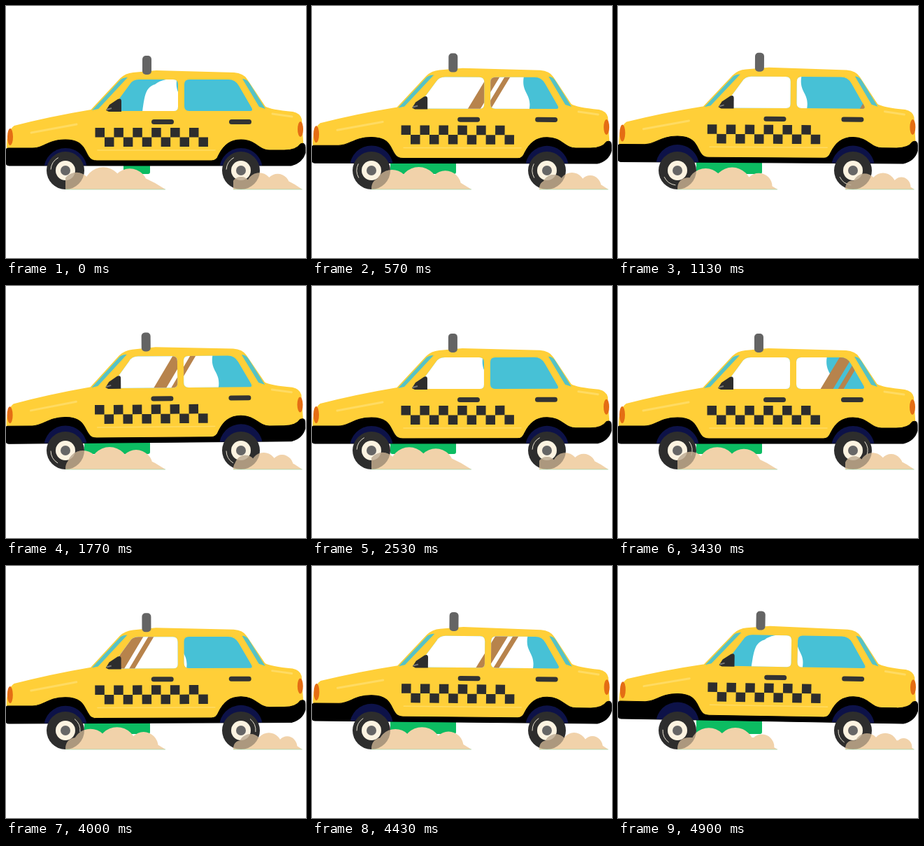
An HTML page with a canvas that plays this animation: 429x360 px, repeating every 5000 ms.

```html
<!DOCTYPE html>
<html lang="en">
<head>
<meta charset="utf-8">
<title>Taxi</title>
<style>
html, body { margin: 0; height: 100%; overflow: hidden; background: #fff; }
canvas { display: block; }
</style>
</head>
<body>
<canvas id="stage" width="429" height="360"></canvas>
<script>
const ctx = document.getElementById('stage').getContext('2d');
const LOOP = 5000, CYCLE = LOOP / 4, STEP = 1000 / 15, TAU = 2 * Math.PI;
const TEAL = '#47c1d6', DARK = '#2d2d2d', YELLOW = '#ffcf38', SHINE = '#ffdb62';
const WHEELS = [85, 336];

const body = new Path2D(`M2 205 Q1 180 12 172 Q62 159 122 149 L164 104 Q171 97 182 96
  L215 93 L326 96 Q339 97 344 105 L370 144 Q378 149 410 152 Q420 154 422 162
  L425 208 H375 V224 H60 V208 Z`);
const skirt = new Path2D(`M3 203 H38 C54 203 60 191 85 191 C112 191 112 207 119 216
  Q122 221 130 221 H294 Q301 221 304 213 C311 199 320 191 336 191
  C358 191 361 206 377 206 H398 Q415 206 421 197 Q428 194 428 202 V210
  Q424 224 408 228 H4 Q0 228 0 224 V206 Q0 203 3 203 Z`);
const panes = new Path2D(`M190 105 H239 Q246 105 246 112 V144 Q246 150 240 150 H149
  L177 112 Q181 105 190 105 Z
  M262 105 H318 Q328 105 333 114 L351 145 Q354 150 349 150 H262 Q255 150 255 143 V112 Q255 105 262 105 Z`);
const slivers = new Path2D(`M123 149 L164 105 Q168 102 174 102 L132 147 Z
  M338 104 Q344 104 348 110 L371 147 L362 144 Z`);
const mirror = new Path2D('M148 141 L160 133 Q165 131 165 136 V151 H147 L143 149 Z');

function fill(color, path) {
  ctx.fillStyle = color;
  path ? ctx.fill(path) : ctx.fill();
}

function outline(color, width, path) {
  ctx.strokeStyle = color;
  ctx.lineWidth = width;
  path ? ctx.stroke(path) : ctx.stroke();
}

function disc(color, x, y, rx, ry = rx) {
  ctx.beginPath();
  ctx.ellipse(x, y, rx, ry, 0, 0, TAU);
  fill(color);
}

function pill(color, x, y, w, h, r) {
  ctx.beginPath();
  ctx.roundRect(x, y, w, h, r);
  fill(color);
}

function line(color, width, x1, y1, x2, y2) {
  ctx.beginPath();
  ctx.moveTo(x1, y1);
  ctx.lineTo(x2, y2);
  outline(color, width);
}

function slant(color, x, width) {
  ctx.beginPath();
  ctx.moveTo(x, 152);
  ctx.lineTo(x + 29, 104);
  ctx.lineTo(x + 29 + width, 104);
  ctx.lineTo(x + width, 152);
  fill(color);
}

// pale scenery and a double pole pass behind the glass
function drawWindows(t) {
  const phase = t % CYCLE;
  const left = 120 + 75 * Math.cos(Math.PI * t / LOOP) ** 40;
  const right = 284 - 34 * Math.cos(TAU * (phase - 75) / CYCLE);
  const pole = 110 + .18 * phase + 3e-5 * phase ** 2;
  fill(TEAL, panes);
  fill('#55c2c6', slivers);
  ctx.save();
  ctx.clip(panes);
  ctx.beginPath();
  ctx.moveTo(left, 151);
  ctx.bezierCurveTo(left + 3, 130, left + 4, 116, left + 18, 112);
  ctx.quadraticCurveTo(left + 26, 105, left + 42, 104);
  ctx.lineTo(right - 8, 104);
  ctx.bezierCurveTo(right - 12, 128, right + 4, 128, right, 151);
  fill('#fff');
  slant('#b7834c', pole, 18);
  slant('#b7834c', pole + 25, 8);
  ctx.restore();
}

function drawBody(t, settle) {
  // the rocking is strongest around the loop's start and fades towards its middle
  const strength = .5 + .5 * Math.cos(TAU * (t - 550) / LOOP);
  const tilt = settle * strength * Math.cos(TAU * 9 * (t - 4880) / LOOP);
  const lift = settle * (3 + 4 * Math.abs(tilt));
  ctx.save();
  ctx.translate(215, 235 - lift);
  ctx.rotate(1.2 * tilt * Math.PI / 180);
  ctx.translate(-215, -235);
  fill(YELLOW, body);
  outline(YELLOW, 2, body);
  fill('#000', skirt);
  outline('#000', 1, skirt);
  for (const x of WHEELS) {
    ctx.beginPath();
    ctx.arc(x, 234, 31, Math.PI + .2, -.2);
    fill('#0d1248');
  }
  pill('#646464', 195, 71, 13, 27, 5);
  drawWindows(t);
  fill(DARK, mirror);
  line('#777', 2, 144, 148, 151, 146);
  disc('#e46d14', 6, 187, 4, 12);
  disc('#e46d14', 421, 176, 4, 11);
  for (const x of [208, 319]) pill('#333', x, 162, 32, 7, 3.5);
  ctx.fillStyle = DARK;
  for (let i = 0; i < 12; i++) ctx.fillRect(127.5 + i * 13.45, 174 + i % 2 * 13.5, 13.5, 13.5);
  ctx.lineCap = 'round';
  line(SHINE, 3, 36, 181, 101, 169);
  line(SHINE, 3, 381, 154, 409, 158);
  line(SHINE, 1.5, 131, 206, 299, 206);
  ctx.restore();
}

function drawWheels(t) {
  const angle = TAU * (t / (CYCLE / 2) - .41);
  for (const x of WHEELS) {
    disc(DARK, x, 235, 27);
    disc('#fcf3e1', x, 235, 14);
    disc('#666', x, 235, 7);
    ctx.beginPath();
    ctx.arc(x, 235, 21, angle - .5, angle + .5);
    outline('#e8e2d2', 1);
  }
}

function drawSmoke(x, sx, sy, t) {
  const gap = 38, shift = t / (CYCLE / 3) % 1 * gap;
  ctx.save();
  ctx.translate(x, 262);
  ctx.scale(sx, sy);
  ctx.beginPath();
  ctx.rect(0, -60, 150, 60);
  ctx.clip();
  ctx.beginPath();
  for (let px = 16 + shift - gap; px < 125; px += gap) {
    if (px < 8) continue;
    const r = 28 * Math.sqrt(Math.sin(Math.PI * (px + 10) / 150));
    ctx.moveTo(px + r, -4);
    ctx.arc(px, -4, r, 0, TAU);
  }
  ctx.moveTo(0, 0);
  ctx.quadraticCurveTo(0, -17, 18, -17);
  ctx.lineTo(112, -17);
  ctx.quadraticCurveTo(128, -10, 143, 0);
  fill('#f1d2aa');
  // the tyre shows faintly through the dust
  ctx.clip();
  ctx.resetTransform();
  ctx.globalAlpha = .35;
  drawWheels(t);
  ctx.restore();
  line('#8fcf9c', .6, x, 262, x + 143 * sx, 262);
}

function draw(time) {
  const t = Math.max(0, Math.floor((time - 33) / STEP) * STEP + 33);
  const settle = Math.min(1, t / 150);
  ctx.fillStyle = '#fff';
  ctx.fillRect(0, 0, 429, 360);
  const grass = 168 - 56 * settle;
  pill('#0cbc62', grass, 214, 206 - grass, 26, 3);
  drawBody(t, settle);
  drawWheels(t);
  drawSmoke(85, 1, 1, t);
  drawSmoke(325, .69, .75, t);
}

function tick() {
  draw(performance.now() % LOOP);
  requestAnimationFrame(tick);
}
tick();
</script>
</body>
</html>
```
